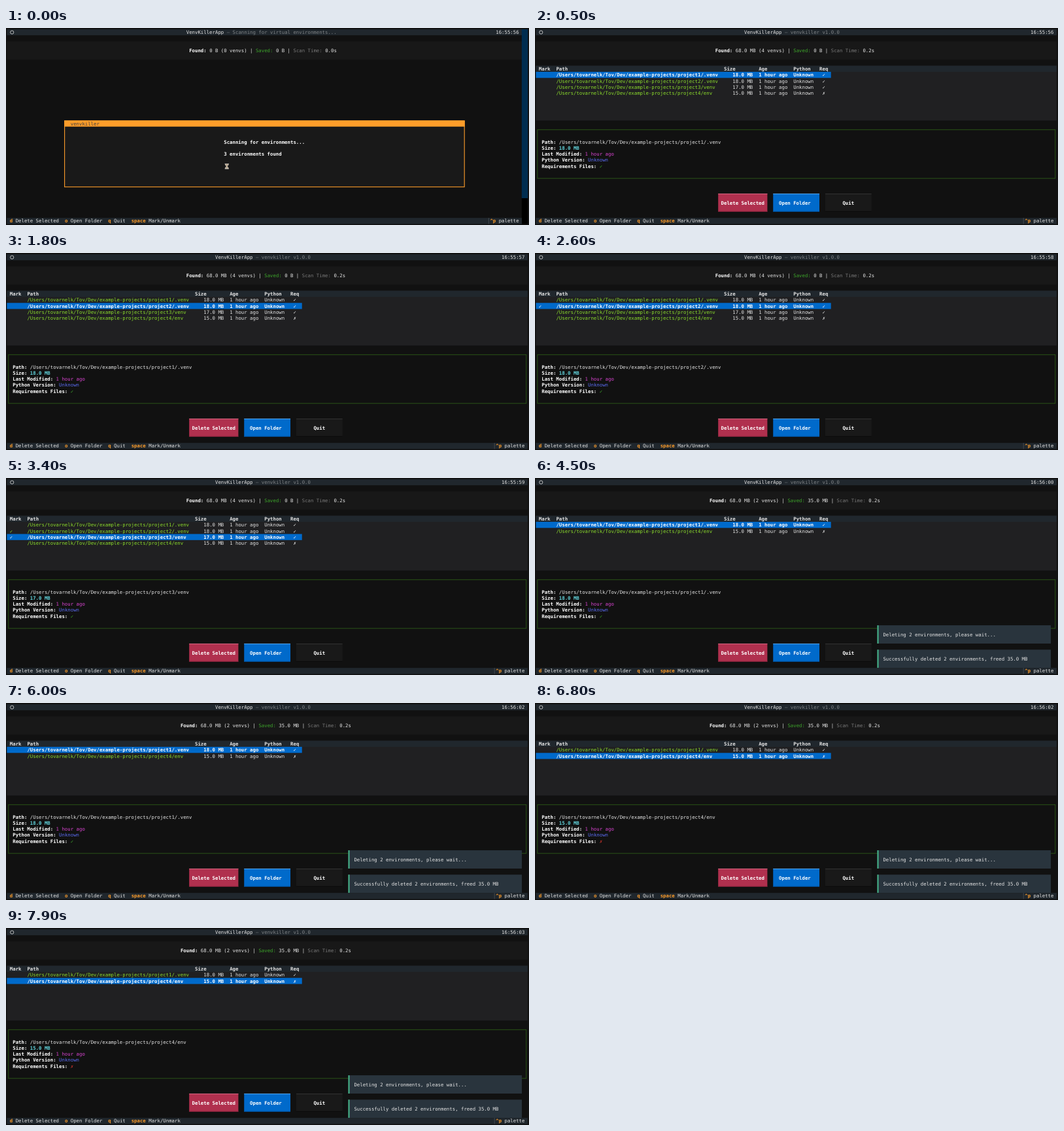
An HTML page for the animation above (8000 ms loop, 800 px wide and 301 px high).

```html
<!DOCTYPE html>
<html lang="en">
<head>
<meta charset="utf-8">
<title>venvkiller</title>
<style>
  html, body { margin: 0; width: 100%; height: 100%; overflow: hidden; background: #111; }
  svg { display: block; width: 800px; height: 301px; }
  text {
    font: 7.35px "DejaVu Sans Mono", "Liberation Mono", monospace;
    white-space: pre;
    text-rendering: geometricPrecision;
  }
  .b { font-weight: bold; }
</style>
</head>
<body>
<svg id="stage" viewBox="0 0 800 301" xmlns="http://www.w3.org/2000/svg"></svg>
<script>
const LOOP = 8000;
const stage = document.getElementById('stage');

const C = {
  bg: '#111111', band: '#181818', bar: '#20272d', table: '#202022', text: '#e4e4e4', white: '#ffffff',
  dim: '#7d8285', grey: '#777777', blue: '#006acb', lime: '#8bdc2c', green: '#3da52b',
  orange: '#fe9d2a', cyan: '#62d4dc', pink: '#d744cf', violet: '#5b6cf2', red: '#d0342c'
};

// Terminal grid: 180 columns by 32 rows
const colX = c => 1.4 + c * 4.425;
const rowY = r => 1.85 + r * 9.3;

const rect = (x, y, w, h, fill) => `<rect x="${x}" y="${y}" width="${w}" height="${h}" fill="${fill}"/>`;
const cells = (c, r, w, h, fill) => rect(colX(c), rowY(r), w * 4.425, h * 9.3, fill);
const text = (c, r, str, fill = C.text, bold = false) =>
  `<text x="${colX(c)}" y="${rowY(r) + 7.25}" fill="${fill}"${bold ? ' class="b"' : ''}>${str}</text>`;

// Consecutive [string, color, bold] runs on one row
function runs(c, r, parts) {
  return parts.map(([str, fill, bold]) => {
    const out = text(c, r, str, fill, bold);
    c += str.length;
    return out;
  }).join('');
}

const HOME = '/Users/tovarnelk/Tov/Dev/example-projects/';
const envs = [
  { path: 'project1/.venv', size: '18.0', req: true },
  { path: 'project2/.venv', size: '18.0', req: true },
  { path: 'project3/venv', size: '17.0', req: true },
  { path: 'project4/env', size: '15.0', req: false }
].map(e => ({ ...e, path: HOME + e.path, size: e.size + ' MB' }));

const tick = ok => ok ? '✓' : '✗';

function header(s) {
  const subtitle = s.scanning ? 'Scanning for virtual environments...' : 'venvkiller v1.0.0';
  const seconds = 56 + s.second;
  const clock = `16:${55 + Math.floor(seconds / 60)}:${String(seconds % 60).padStart(2, '0')}`;
  return cells(0, 0, s.cols, 1, C.bar)
    + `<circle cx="9.2" cy="6.6" r="2.6" fill="none" stroke="${C.text}" stroke-width=".8"/>`
    + runs(s.scanning ? 62 : 72, 0, [['VenvKillerApp', C.text], [' — ', C.dim], [subtitle, C.dim]])
    + text(s.cols - 9, 0, clock);
}

function summary(s) {
  const found = s.scanning ? '0 B (0 venvs)' : `68.0 MB (${s.list.length} venvs)`;
  const start = s.scanning ? 63 : s.deleted ? 60 : 62;
  return cells(0, 2, s.cols, 3, C.band) + runs(start, 3, [
    ['Found:', C.white, true], [` ${found} | `, C.text],
    ['Saved:', C.green], [` ${s.deleted ? '35.0 MB' : '0 B'} | `, C.text],
    ['Scan Time:', C.grey], [s.scanning ? ' 0.0s' : ' 0.2s', C.text]
  ]);
}

function footer(s) {
  const keys = [[1, 'd', 'Delete Selected'], [20, 'o', 'Open Folder'], [35, 'q', 'Quit'],
    [43, 'space', 'Mark/Unmark'], [s.cols - 11, '^p', 'palette']];
  return cells(0, 31, s.cols, 1, C.bar)
    + rect(colX(s.cols - 12) + 2, rowY(31), .7, 9.3, '#50575c')
    + keys.map(([c, key, label]) => runs(c, 31, [[key, C.orange, true], [' ' + label, C.text]])).join('');
}

function scanDialog() {
  const glass = 'M334.6 207.6H341M334.6 215H341M335.4 208C335.4 210.4 337.2 210.4 337.2 211.3'
    + 'S335.4 212.4 335.4 214.8H340.2C340.2 212.4 338.4 212.2 338.4 211.3S340.2 210.4 340.2 208';
  return rect(89.6, 141.8, 611.6, 101, '#191919')
    + `<rect x="89.6" y="141.8" width="611.6" height="101" fill="none" stroke="${C.orange}" stroke-width="1.1"/>`
    + rect(89.1, 141.4, 612.6, 9.3, C.orange)
    + text(22, 15, 'venvkiller', '#44423e')
    + text(75, 18, 'Scanning for environments...', C.white, true)
    + text(75, 20, '3 environments found', C.white, true)
    + `<path d="${glass}" fill="#b9a58c" stroke="#d8d2c8" stroke-width=".8"/>`
    + rect(788.9, 1.9, 9.2, 258.2, '#012d50')
    + rect(788.9, 260.1, 9.2, 39.3, '#000');
}

function table(s) {
  const heads = [[1, 'Mark'], [7, 'Path'], [65, 'Size'], [77, 'Age'], [89, 'Python'], [98, 'Req']];
  let out = cells(0, 6, 180, 9, C.table) + cells(0, 6, 180, 1, C.bar)
    + heads.map(([c, label]) => text(c, 6, label, C.text, true)).join('');
  s.list.forEach((i, n) => {
    const env = envs[i], row = 7 + n, on = n === s.cursor;
    const cell = (c, str, fill) => text(c, row, str, on ? C.white : fill, on);
    if (on) out += cells(0, row, 102, 1, C.blue);
    if (s.marks.includes(i)) out += cell(1, '✓', C.lime);
    out += cell(7, env.path, C.lime) + cell(68, env.size) + cell(77, '1 hour ago')
      + cell(89, 'Unknown') + cell(99, tick(env.req));
  });
  return out;
}

function details(s) {
  const env = envs[s.shown];
  const lines = [
    ['Path:', env.path, C.text],
    ['Size:', env.size, C.cyan, true],
    ['Last Modified:', '1 hour ago', C.pink],
    ['Python Version:', 'Unknown', C.violet],
    ['Requirements Files:', tick(env.req), env.req ? C.green : C.red]
  ];
  return `<rect x="3.8" y="155.3" width="792" height="74.5" fill="none" stroke="#2c5a17" stroke-width=".9"/>`
    + lines.map(([label, value, fill, bold], n) =>
      runs(2, 18 + n, [[label, C.white, true], [' ' + value, fill, bold]])).join('');
}

function button(c, w, label, inset, fill, light, dark) {
  const x = colX(c), y = rowY(27), width = w * 4.425;
  return rect(x, y, width, 27.9, fill) + rect(x, y, width, 1.1, light)
    + rect(x, y + 26.8, width, 1.1, dark) + text(c + inset, 28, label, C.white, true);
}

const buttons = () =>
  button(63, 17, 'Delete Selected', 1, '#b0304e', '#d0607c', '#7d2138')
  + button(82, 16, 'Open Folder', 2, C.blue, '#4b9fe6', '#004b94')
  + button(100, 16, 'Quit', 6, '#191919', '#303030', '#0b0b0b');

const toast = (row, str) => cells(118, row, 60, 3, '#29343d')
  + rect(colX(118), rowY(row), 2, 27.9, '#46b58a') + text(120, row + 1, str);

function toasts(s) {
  const busy = 'Deleting 2 environments, please wait...';
  if (s.deleted) return toast(24, busy) + toast(28, 'Successfully deleted 2 environments, freed 35.0 MB');
  return s.deleting ? toast(28, busy) : '';
}

function stateAt(t) {
  const scanning = t < 100;
  const deleted = t >= 4200;
  const list = deleted ? [0, 3] : [0, 1, 2, 3];
  const cursorAt = time => time >= 6700 ? 1 : time >= 4200 ? 0 : time >= 2800 ? 2 : time >= 1800 ? 1 : 0;
  const marks = deleted ? [] : [[2300, 1], [3300, 2]].filter(m => t >= m[0]).map(m => m[1]);
  // The detail panel follows the cursor a moment later
  const shown = deleted ? list[cursorAt(t - 100) % 2 && t >= 6800 ? 1 : 0] : list[cursorAt(t - 100)];
  return { scanning, deleted, deleting: t >= 4000, list, marks, shown,
    cursor: cursorAt(t), second: Math.floor(t / 1000), cols: scanning ? 178 : 180 };
}

function draw(s) {
  const body = s.scanning ? scanDialog() : table(s) + details(s) + buttons() + toasts(s);
  stage.innerHTML = rect(0, 0, 800, 301, C.bg) + header(s) + summary(s) + body + footer(s);
}

let last = '';
function frame(now) {
  const state = stateAt(now % LOOP);
  const key = JSON.stringify(state);
  if (key !== last) {
    draw(state);
    last = key;
  }
  requestAnimationFrame(frame);
}

draw(stateAt(0));
requestAnimationFrame(start => {
  const tickFrom = now => { frame.call(null, now); };
  tickFrom(start);
});
</script>
</body>
</html>
```
